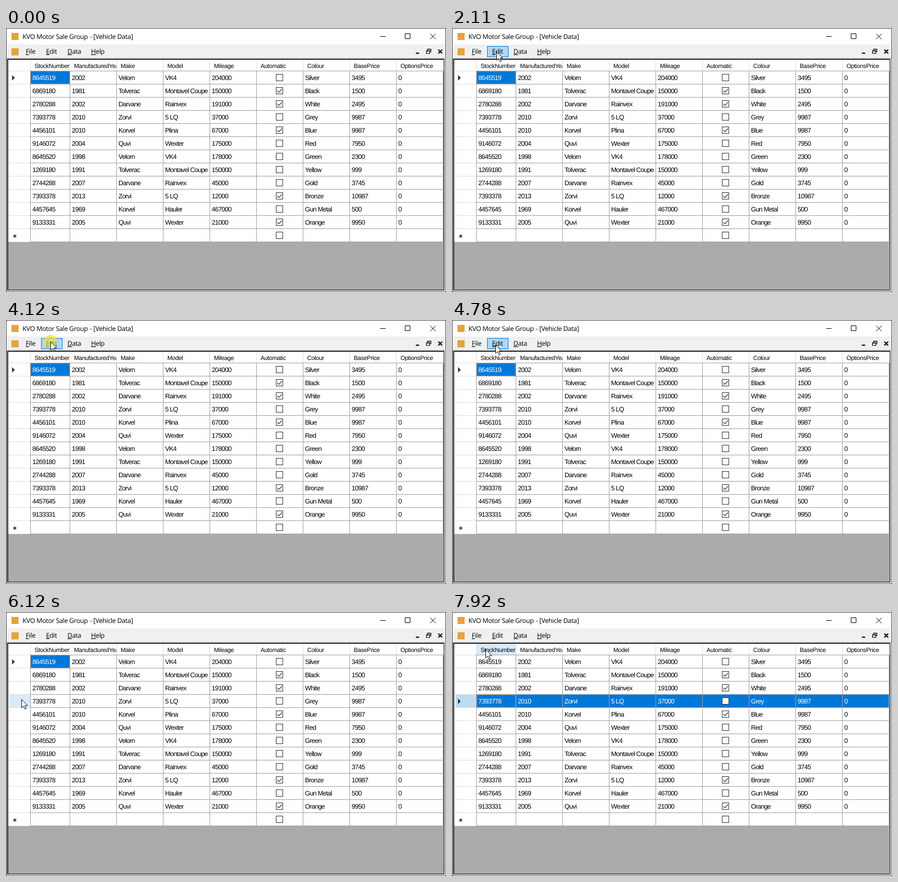
An HTML page that plays this animation: 802 by 482 pixels, repeating every 7990 ms.

```html
<!DOCTYPE html>
<html lang="en">
<head>
<meta charset="utf-8">
<title>Vehicle Data</title>
<style>
html, body { margin: 0; width: 100%; height: 100%; overflow: hidden; }
svg { display: block; width: 802px; height: 482px; }
text { white-space: pre; text-rendering: geometricPrecision; }
.ui { font: 12px "Open Sans", "Noto Sans", sans-serif; letter-spacing: -.35px; }
.head { font: 11px "Liberation Sans", Arial, sans-serif; letter-spacing: -.3px; }
.cell { font: 12px "Liberation Sans", Arial, sans-serif; letter-spacing: -.7px; }
.key { text-decoration: underline; }
</style>
</head>
<body>
<svg id="stage" viewBox="0 0 802 482"></svg>
<script>
const LOOP = 7990, STEP = 70, TOP = 79, ROW = 24;
const BLUE = '#0078d7', HOVER = '#d9ebf9', GRID = '#a0a0a0';
const edges = [44, 116, 201, 286, 371, 456, 541, 626, 711, 796];
const heads = 'StockNumber,ManufacturedYear,Make,Model,Mileage,Automatic,Colour,BasePrice,OptionsPrice'.split(',');
const CHECK_COL = 5;
const rows = `8645519,2002,Velorn,VK4,204000,n,Silver,3495,0
6869180,1981,Tolverac,Montavel Coupe,150000,y,Black,1500,0
2780288,2002,Darvane,Rainvex,191000,y,White,2495,0
7393778,2010,Zorvi,5 LQ,37000,n,Grey,9987,0
4456101,2010,Korvel,Plina,67000,y,Blue,9987,0
9146072,2004,Quvi,Wexter,175000,n,Red,7950,0
8645520,1998,Velorn,VK4,178000,n,Green,2300,0
1269180,1991,Tolverac,Montavel Coupe,150000,n,Yellow,999,0
2744288,2007,Darvane,Rainvex,45000,n,Gold,3745,0
7393378,2013,Zorvi,5 LQ,12000,y,Bronze,10987,0
4457645,1969,Korvel,Hauler,467000,n,Gun Metal,500,0
9133331,2005,Quvi,Wexter,21000,y,Orange,9950,0
,,,,,n,,,`.split('\n').map(r => r.split(','));

// Pointer keys: time, x, y
const keys = [
  [990, 711, 162], [1130, 615, 148], [1340, 300, 96], [1480, 142, 71], [1550, 109, 67],
  [1760, 86, 64], [1830, 84, 62], [1970, 82, 51], [2170, 81, 40], [2240, 81, 39],
  [4710, 81, 39], [4780, 79, 45], [4920, 73, 66], [5130, 60, 100], [5340, 48, 130],
  [5480, 42, 140], [5550, 37, 142], [5620, 36, 143], [5820, 32, 145], [5970, 31, 148],
  [6040, 29, 154], [6110, 28, 159], [7180, 28, 158], [7570, 28, 158], [7640, 30, 152], [7710, 36, 130],
  [7780, 46, 105], [7920, 61, 68]
];
const starts = [0, 990, 1830, 4780, 5620, 5970, 6770, 7640];
const presses = [[2310, 2650], [4120, 4250], [6770, 6910]];
const MENU_ON = 2310, MENU_OFF = 4120, SELECT = 6770;

const stage = document.getElementById('stage');
function add(tag, attrs, parent = stage) {
  const el = document.createElementNS('http://www.w3.org/2000/svg', tag);
  return parent.appendChild(set(el, attrs));
}
function set(el, attrs) {
  for (const k in attrs) el.setAttribute(k, attrs[k]);
  return el;
}
const rect = (x, y, width, height, fill, parent) => add('rect', { x, y, width, height, fill }, parent);
const frame = (x, y, w, h, stroke, fill = 'none', parent) =>
  set(rect(x + .5, y + .5, w - 1, h - 1, fill, parent), { stroke });
const path = (d, stroke, width = 1, fill = 'none', parent) =>
  add('path', { d, stroke, 'stroke-width': width, fill }, parent);
function label(x, y, str, cls, fill = '#000', parent) {
  const el = add('text', { x, y, class: cls, fill }, parent);
  el.textContent = str;
  return el;
}
function keyed(x, y, str, fill, parent) {
  const el = label(x, y, '', 'ui', fill, parent);
  add('tspan', { class: 'key' }, el).textContent = str[0];
  el.append(str.slice(1));
}
const show = (el, on) => el.setAttribute('visibility', on ? 'visible' : 'hidden');

// Window chrome
rect(0, 0, 802, 482, '#f0f0f0');
rect(0, 0, 802, 30, '#fff');
rect(10, 9, 13, 13, '#e5a33c');
label(30, 20, 'KVO Motor Sale Group', 'ui');
label(153, 20, '- [Vehicle Data]', 'ui');
path('M682 15.5h10M727.5 10.5h9v9h-9zM773 10.5l10 10M783 10.5l-10 10', '#000');
rect(10, 37, 13, 13, '#e5a33c');
path('M747 46h6M788 39.5l7 7M795 39.5l-7 7', '#000', 2);
path('M768.5 41V38.5h6v5H773M766.5 41.5h6v5h-6zM768 39h7M766 42h7', '#000', 1.2);
const editBox = frame(64, 33, 39, 20, BLUE, '#b3d7f3');
[[36, 'File'], [73, 'Edit'], [112, 'Data'], [155, 'Help']].forEach(([x, s]) => keyed(x, 47, s));

// Sunken client edge
rect(1, 55, 800, 426, '#fff');
rect(1, 55, 799, 425, '#a0a0a0');
rect(2, 56, 798, 424, '#e3e3e3');
rect(2, 56, 797, 423, '#696969');
rect(3, 57, 796, 422, '#000');
rect(4, 58, 794, 420, '#ababab');
frame(0, 0, 802, 482, '#4a4a4a');

// Grid
rect(4, 58, 793, 333, '#fff');
let firstHead;
heads.forEach((s, c) => {
  const x = edges[c] + 1;
  const back = rect(x, 58, edges[c + 1] - x, 20, '#fff');
  if (!c) firstHead = back;
  label(edges[c] + 8, 73, s, 'head');
});
rect(797, 58, 1, 20, '#fff');
edges.forEach(x => rect(x, 58, 1, 20, '#e0e0e0'));
const lines = rows.map((data, r) => {
  const y = TOP + r * ROW;
  const side = rect(6, y, 38, ROW - 1, '#fff');
  rect(5, y + ROW - 1, 39, 1, '#e0e0e0');
  const fills = [], texts = [];
  data.forEach((s, c) => {
    const x = edges[c];
    fills.push(rect(x + 1, y, edges[c + 1] - x - 1, ROW - 1, '#fff'));
    if (c === CHECK_COL) {
      frame(492, y + 5, 13, 13, '#333', '#fff');
      if (s === 'y') path(`M494.5 ${y + 11.5}l3 3 5.5-6`, '#333', 1.2);
    } else if (s) texts.push(label(x + 4, y + 16, s, 'cell'));
  });
  rect(44, y + ROW - 1, 753, 1, GRID);
  return { side, fills, texts };
});
rect(44, 78, 753, 1, GRID);
rect(5, 78, 39, 1, '#e0e0e0');
edges.forEach(x => rect(x, 78, 1, 313, GRID));
const focus = frame(45, TOP, 71, ROW - 1, '#c08a50');
set(focus, { 'stroke-dasharray': '1 1' });
const marker = path('M11 86l5 5-5 5z', 'none', 0, '#333');
path('M16 376.8v6.4M13.2 378.4l5.6 3.2M18.8 378.4l-5.6 3.2', '#444', 1.5);

// Drop-down
const menu = add('g', {});
for (let i = 3; i > 0; i--) set(rect(67, 55, 129 + i, 23 + i, '#000', menu), { opacity: .15 });
frame(64, 52, 132, 26, '#808080', '#f2f2f2', menu);
frame(64, 33, 39, 20, '#808080', '#f6f6f6', menu);
rect(65, 52, 37, 1, '#f6f6f6', menu);
keyed(73, 47, 'Edit', '#000', menu);
keyed(100, 69, 'Delete', '#6d6d6d', menu);
label(147, 69, 'Del', 'ui', '#6d6d6d', menu);

// Pointer
const pointer = add('g', {});
const halo = add('circle', { r: 12, fill: '#ece03c', opacity: .72 }, pointer);
const arrow = path('M.5 .5V16L4 12.7 6.5 18.5 8.9 17.5 6.4 11.8H11.4Z', '#111', 1, '#fff', pointer);
const sizer = path('M-11 0l5-4.5v3H6v-3L11 0 6 4.5v-3H-6v3z', '#333', 1, '#fff', pointer);

function pose(t) {
  const i = keys.findIndex(k => k[0] > t);
  if (i < 0) return keys[keys.length - 1].slice(1);
  const [a, ax, ay] = keys[i - 1], [b, bx, by] = keys[i];
  const u = (t - a) / (b - a);
  return [Math.round(ax + (bx - ax) * u), Math.round(ay + (by - ay) * u)];
}

function draw(t) {
  const start = starts.filter(s => s <= t).pop();
  const q = start + Math.floor((t - start) / STEP) * STEP;
  const live = t >= 990;
  const [x, y] = live ? pose(q) : [-50, -50];
  const open = t >= MENU_ON && t < MENU_OFF;
  const picked = t >= SELECT;
  const inSide = x >= 4 && x <= 44 && y >= TOP;
  const hoverRow = inSide ? Math.floor((y - TOP) / ROW) : -1;
  const sizing = inSide && x >= 39;

  set(firstHead, { fill: x > 44 && x < 117 && y >= 58 && y < 79 ? HOVER : '#fff' });
  show(editBox, x >= 64 && x <= 102 && y >= 33 && y <= 52);
  lines.forEach((row, r) => {
    const on = picked && r === 3;
    set(row.side, { fill: on ? '#bcdcf4' : r === hoverRow ? HOVER : '#fff' });
    row.fills.forEach((f, c) => set(f, { fill: on || (!picked && !r && !c) ? BLUE : '#fff' }));
    row.texts.forEach((s, c) => set(s, { fill: on || (!picked && !r && !c) ? '#fff' : '#000' }));
  });
  const shift = `translate(0 ${picked ? 3 * ROW : 0})`;
  set(marker, { transform: shift });
  set(focus, { transform: shift });

  show(menu, open);
  set(menu, { opacity: Math.min(1, Math.max(0, (q - MENU_ON + STEP) / 210)) });
  set(pointer, { transform: `translate(${x} ${y})` });
  show(halo, presses.some(([a, b]) => t >= a && t < b));
  show(arrow, live && !sizing);
  show(sizer, sizing);
}

const origin = performance.now();
function tick() {
  draw((performance.now() - origin) % LOOP);
  requestAnimationFrame(tick);
}
draw(0);
requestAnimationFrame(tick);
</script>
</body>
</html>
```
